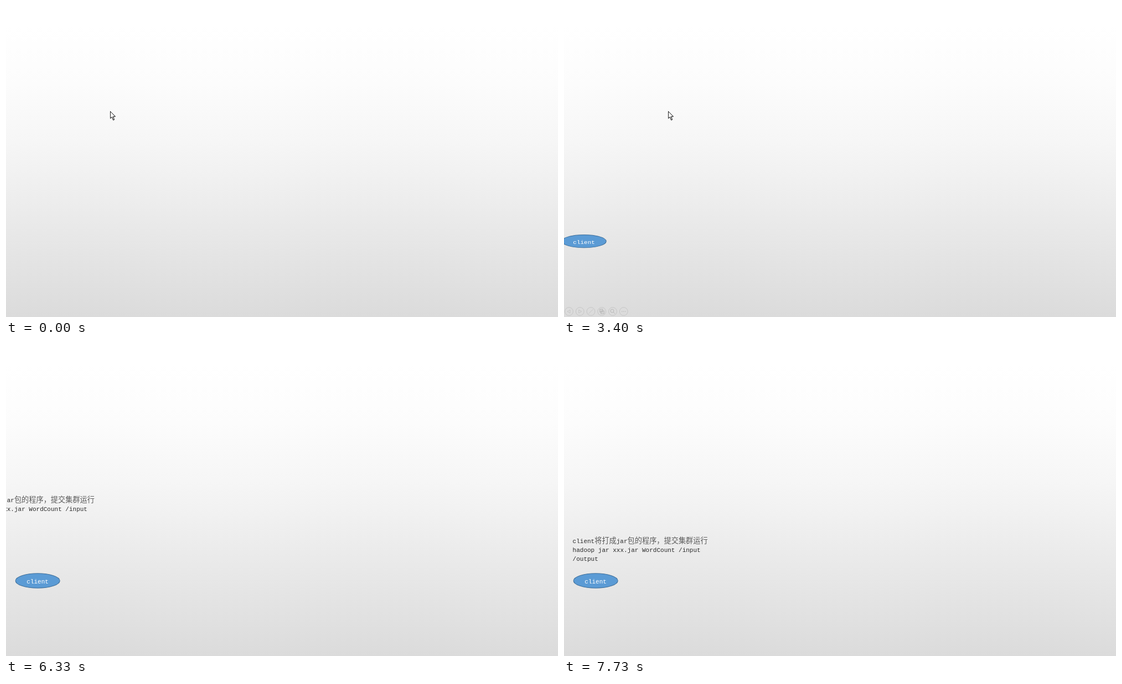
An HTML page with a canvas that plays this animation: 997 px wide and 562 px high, repeating every 8000 ms.

```html
<!DOCTYPE html>
<html lang="zh">
<head>
<meta charset="utf-8">
<style>
  html, body { margin: 0; width: 100%; height: 100%; overflow: hidden; }
  canvas { display: block; }
</style>
</head>
<body>
<canvas id="stage" width="997" height="562"></canvas>
<script>
const W = 997, H = 562, LOOP = 8000, STEP = 1000 / 15;
const LATIN = '11px "Liberation Mono", monospace';
const HAN = '300 13.2px "Noto Sans CJK SC", "Noto Sans CJK", sans-serif';
const ctx = document.getElementById('stage').getContext('2d');

// Rises as a square up to the middle, then goes on in a straight line
const bend = u => (u * u - Math.max(0, u - .5) ** 2) * 4 / 3;

const backdrop = ctx.createLinearGradient(0, 0, 0, H);
for (let p = 0; p <= 1; p += 1 / 16) {
  const v = 255 - 36 * bend(p);
  backdrop.addColorStop(p, `rgb(${v} ${v} ${v})`);
}

const SLIDE = [[0, 0], [.14, .36], [.43, .73], [.71, .91], [1, 1]];

function slide(u) {
  if (u >= 1) return 1;
  const i = SLIDE.findIndex(p => p[0] > u);
  const [x0, y0] = SLIDE[i - 1], [x1, y1] = SLIDE[i];
  return y0 + (y1 - y0) * (u - x0) / (x1 - x0);
}

// Each hop lasts half as long as the one before and is a third as high
function bounce(t) {
  let lift = 0, squash = 1;
  let start = -664, span = 1328;
  for (let k = 0; k < 4; k++) {
    const u = Math.abs(2 * (t - start) / span - 1);
    if (u < 1) lift = H / 3 ** (k + 1) * Math.cos(Math.PI / 2 * (16 ** u - 1) / 15);
    start += span;
    span /= 2;
    const age = t - start + 16;
    if (age > 0) {
      const press = age < 26 ? age / 26 : 1 - bend(Math.min(1, (age - 26) / 166));
      squash = 1 - .4 / 2 ** k * press;
    }
  }
  return { lift, squash };
}

// Slide in from the left, hop, and wipe up from the bottom
function bounceIn(t, box, paint) {
  const { lift, squash } = bounce(t);
  const mid = box.y + box.h / 2;
  ctx.save();
  ctx.translate(-W / 4 * (1 - slide(t / 1822)), mid - lift);
  ctx.scale(1, squash);
  ctx.translate(0, -mid);
  const shown = box.h * Math.min(1, t / 580);
  ctx.beginPath();
  ctx.rect(box.x, box.y + box.h - shown, box.w, shown);
  ctx.clip();
  paint();
  ctx.restore();
}

function write(text, x, y, latinColor, hanColor) {
  for (const run of text.match(/[\x00-\x7f]+|[^\x00-\x7f]+/g)) {
    const latin = run.charCodeAt(0) < 128;
    ctx.font = latin ? LATIN : HAN;
    ctx.fillStyle = latin ? latinColor : hanColor;
    ctx.fillText(run, x, y);
    x += ctx.measureText(run).width;
  }
}

function paintClient() {
  ctx.beginPath();
  ctx.ellipse(57.2, 426, 40, 13.2, 0, 0, 2 * Math.PI);
  ctx.fillStyle = '#5b9bd5';
  ctx.fill();
  ctx.strokeStyle = '#41719c';
  ctx.lineWidth = 1.1;
  ctx.stroke();
  write('client', 37.3, 431, '#fff');
}

function paintNote() {
  const lines = ['client将打成jar包的程序，提交集群运行', 'hadoop jar xxx.jar WordCount /input', '/output'];
  lines.forEach((text, i) => write(text, 15.6, 358 + 16 * i, '#2a2a2a', '#5a5a5a'));
}

function line(points, close) {
  ctx.beginPath();
  points.forEach(p => ctx.lineTo(...p));
  if (close) ctx.closePath();
  ctx.stroke();
}

function ring(x, y, r) {
  ctx.beginPath();
  ctx.arc(x, y, r, 0, 2 * Math.PI);
  ctx.stroke();
}

function paintCursor() {
  ctx.fillStyle = '#fff';
  ctx.strokeStyle = '#222';
  ctx.lineWidth = 1;
  ctx.save();
  ctx.translate(188.5, 190.5);
  line([[0, 0], [0, 12.5], [2.8, 10], [5.2, 15.6], [7, 14.8], [4.7, 9.4], [8.8, 9.2]], true);
  ctx.fill();
  ctx.stroke();
  ctx.restore();
}

const arrow = side => line([[-2 * side, -3], [3 * side, 0], [-2 * side, 3]], true);
const icons = [
  () => arrow(-1),
  () => arrow(1),
  () => line([[4, -4], [-2, 2], [-4, 4]]),
  () => {
    ctx.strokeStyle = '#b4b4b4';
    ctx.strokeRect(-3.5, -4, 5, 5);
    ctx.strokeRect(-1.5, -1, 5.5, 5);
  },
  () => {
    ctx.strokeStyle = '#b8b8b8';
    ring(-1, -1, 3);
    line([[1.2, 1.2], [4, 4]]);
  },
  () => [-3, 0, 3].forEach(x => ring(x, 0, .6))
];

function paintToolbar() {
  ctx.lineWidth = 1;
  icons.forEach((icon, i) => {
    ctx.save();
    ctx.translate(9 + 19.75 * i, 552);
    ctx.strokeStyle = '#c6c6c6';
    ring(0, 0, 7.4);
    icon();
    ctx.restore();
  });
}

function draw(ms) {
  const t = Math.round(Math.floor((ms + 4) / STEP) * STEP / 10) * 10;
  ctx.fillStyle = backdrop;
  ctx.fillRect(0, 0, W, H);
  if (t >= 200 && t < 4600) paintToolbar();
  if (t >= 2730) bounceIn(t - 2073, { x: 16, y: 411, w: 83, h: 30 }, paintClient);
  if (t >= 6070) bounceIn(t - 5732, { x: 8, y: 342, w: 262, h: 55 }, paintNote);
  if (t < 4600) paintCursor();
}

let begin;
function tick(now) {
  begin ??= now;
  draw((now - begin) % LOOP);
  requestAnimationFrame(tick);
}
draw(0);
requestAnimationFrame(tick);
</script>
</body>
</html>
```
